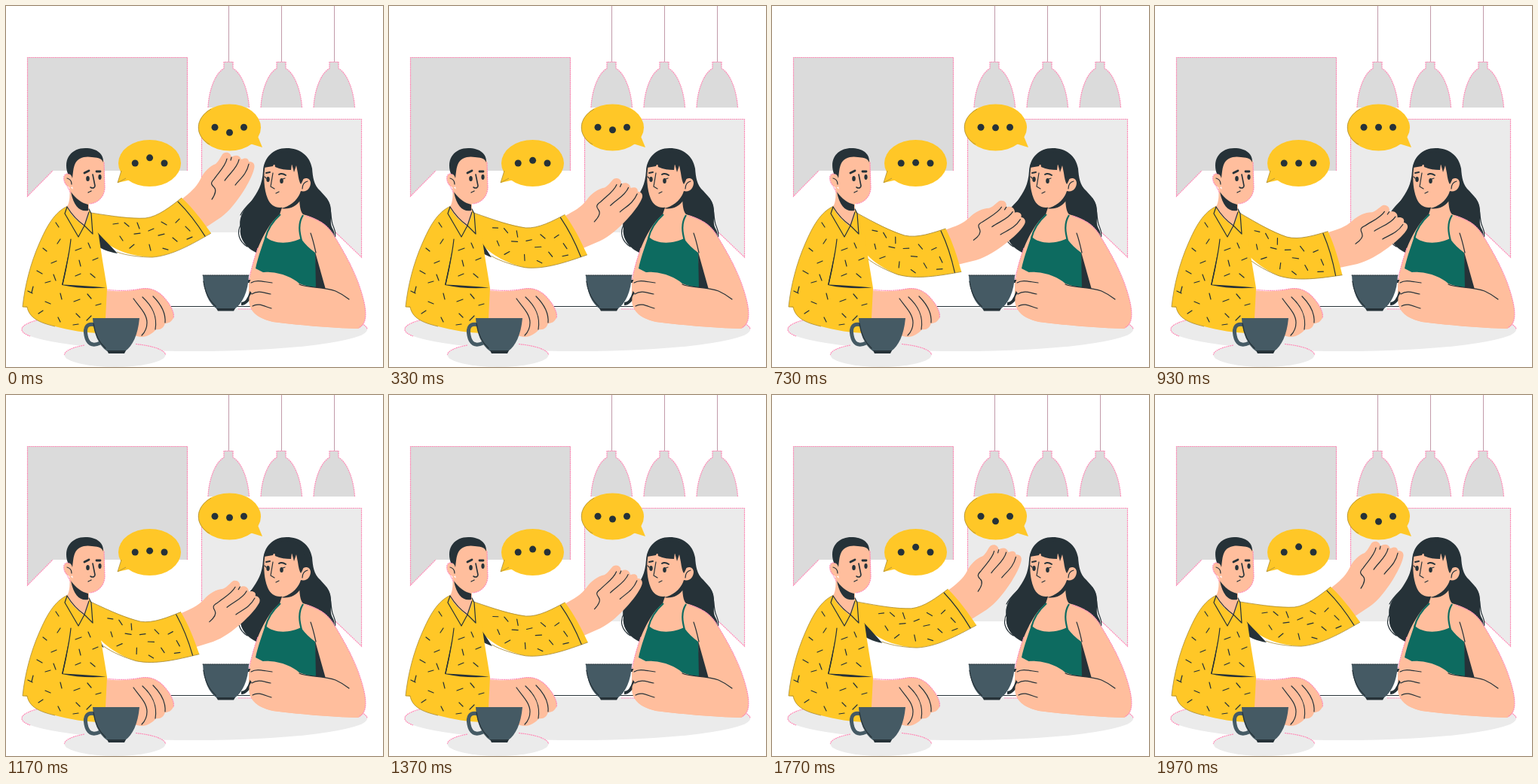
Recreate the animation shown at these times as an HTML page. Size 500 by 480 pixels, loop 2.01 s.

```html
<!DOCTYPE html>
<html lang="en">
<head>
<meta charset="utf-8">
<title>Coffee talk</title>
<style>
  html, body { margin: 0; width: 100%; height: 100%; overflow: hidden; background: #fff; }
  svg { display: block; width: 100vw; height: 100vh; }
  .ink { fill: none; stroke: #263238; stroke-width: 1.2; stroke-linecap: round; stroke-linejoin: round; }
  .brow { stroke-width: 2.8; }
  .rim { fill: none; stroke: #ff8db8; stroke-width: 1.2; stroke-dasharray: 2 .7; }
  .edge { fill: none; stroke: #a88b37; stroke-width: .8; }
  .dark { fill: #263238; }
  .skin { fill: #ffbe9d; }
  .shirt { fill: #ffc727; }
  .cup { fill: #455a64; }
  .wall { fill: #dbdbdb; }
  .pale { fill: #ebebeb; }
</style>
</head>
<body>
<svg viewBox="0 0 500 480" xmlns="http://www.w3.org/2000/svg">
  <defs>
    <g id="lamp">
      <path d="M.5 0V75" stroke="#ff9cc2" fill="none"/>
      <path d="M.5 0V75" stroke="#999" stroke-width=".6" fill="none"/>
      <path class="wall" d="M-6 74H6V83C17 89 26 111 27.500 135H-27C-26 111-17 89-6 83Z"/>
      <path class="rim" d="M-27 135C-26 111-17 89-6 83V74.500H6V83C17 89 26 111 27.500 135"/>
    </g>
  </defs>

  <g id="room">
    <path class="wall" d="M28 68H241V219H62L28 253Z"/>
    <path class="rim" d="M240.500 219V68.500H28.500V253L62 219"/>
    <path class="pale" d="M259 150H472V334L437 301H259Z"/>
    <path class="rim" d="M259.500 301V150.500H471.500V334L437 301"/>
    <use href="#lamp" x="295"/><use href="#lamp" x="365"/><use href="#lamp" x="435"/>
    <ellipse class="pale" cx="250" cy="430" rx="229" ry="29"/>
    <path class="rim" d="M62 413.500C34 418 21 424 21 430Q21 435 32 439M438 413.500C466 418 479 424 479 430"/>
    <ellipse class="pale" cx="144.500" cy="464" rx="67" ry="16"/>
    <path class="rim" d="M104 451C87 454 77.500 459 77.500 464M172 449.500C197 452 211.500 458 211.500 464"/>
    <path d="M210 400.500H335" stroke="#fff" stroke-width="2"/>
    <path class="ink" d="M216 399.500H330"/>
  </g>

  <g id="woman">
    <path class="dark" d="M372 189C354 189 342 202 341 219C340 238 334 247 325 260C313 272 308 284 311 296C309 309 318 322 334 329L378 305L425 312C436 312 438 304 433 296C429 289 432 280 431 272C431 260 424 254 417 246C408 238 407 228 406 216C403 199 390 189 372 189Z"/>
    <path class="ink" d="M342 235C338 254 318 263 311 278M312 290C305 301 309 313 320 320M425 256C432 266 430 280 433 290C436 298 438 302 436 309"/>
    <path class="skin" d="M368 262L389 248C389 264 390 273 394 277C412 282 427 290 436 307C450 330 466 358 474 390C479 410 478 424 467 429C430 428 385 424 354 420C329 414 321 403 322 386C321 365 326 344 334 322C341 305 350 288 363 277Z"/>
    <path fill="#0d6b60" d="M344 306C354 318 379 316 391 309C397 317 403 323 410 328L413 375L370 369L331 349C332 343 334 337 336 330Z"/>
    <path d="M364 277C354 286 347 296 344 309M394 278C387 289 389 301 392 312" fill="none" stroke="#0d6b60" stroke-width="2.200"/>
    <path class="dark" d="M410 327L424 377L411 375Z"/>
    <path class="dark" d="M365 269C376 267 384 260 391 247L390 259C384 267 375 271 365 269Z"/>
    <path class="skin" d="M344 211C341 226 342 244 347 256C351 266 360 270 369 267C380 264 388 256 391 246C399 248 404 242 404 235C403 228 396 227 391 233L388 211Z"/>
    <path class="dark" d="M342 215L354 213L356 209L357 214C364 217 371 218 378 218L379 210L382 221L385 212L387 222C388 229 389 234 391 237C399 225 399 206 386 197C367 188 343 200 342 215Z"/>
    <path class="ink" d="M354 222L351 240L356 243M358 249L362 247M393 243C393 237 396 234 400 233M404 302C407 310 409 319 411 328"/>
    <path class="ink" style="stroke-width:2" d="M345 222L350 221M362 224C365 222 368 223 371 225"/>
    <ellipse class="dark" cx="347.500" cy="230.500" rx="2.200" ry="3.400"/>
    <ellipse class="dark" cx="365.500" cy="232.500" rx="2.300" ry="3.600"/>
    <path class="ink" d="M345 229L343 227M367 230L370 229"/>
    <path class="rim" d="M398 279C418 285 428 293 436 307C450 330 466 358 474 390C479 410 478 424 467 428M334 322C328 339 324 355 322 365M308 403H326"/>
  </g>

  <g id="arm">
    <path class="skin" d="M233 257C244 248 252 242 258 230C262 221 270 213 278 210C283 206 285 199 288 196C293 193 298 195 299 201C304 197 310 198 312 204C317 201 322 202 322 207C327 206 331 210 329 216C327 225 321 236 315 246C306 260 297 272 285 281L264 295Z"/>
    <path class="ink" d="M293 203C291 213 282 221 276 230C270 236 273 238 276 241C280 245 277 251 273 257M309 204C307 215 296 223 290 232M322 210C319 224 310 230 304 238M299 201L298 205"/>
    <path class="shirt" d="M100 273C135 279 159 282 185 282C202 280 219 266 233 255C248 269 260 285 272 302C246 317 220 332 194 334C168 333 143 326 122 306L100 300Z"/>
    <path class="edge" d="M113 275C145 280 165 283 185 282C202 280 219 266 233 255M147 327C160 332 180 334 194 334C220 332 246 317 272 302"/>
    <path class="dark" d="M112 291C126 306 135 315 148 329C136 327 124 323 112 312Z"/>
    <path class="ink" d="M228 260C242 274 254 290 264 306"/>
    <path class="ink" d="M142 290l7-1M157 288l6 5M174 288l3 8M189 299l7-3M206 287l7 4M225 288l5-5M238 293l6 6M151 306l4 6M170 303l8-1M202 305l8-2M221 308l6 5M164 322l6-5M190 317l2 8M208 322l7 2M240 310l7-3"/>
  </g>

  <g id="man">
    <path class="skin" d="M132 378C148 380 163 380 179 376C192 374 202 379 210 388C218 397 224 408 222 415C219 420 216 422 211 422C209 428 205 431 199 430C193 437 184 442 174 439L125 435Z"/>
    <path class="rim" d="M133 377C148 379 163 379 179 376C192 374 202 379 210 388C218 397 224 408 222 415"/>
    <path class="ink" d="M169 389C176 399 187 409 187 421C187 428 184 434 180 438M181 387C194 399 201 412 198 430M195 386C206 397 212 409 211 421"/>
    <path class="shirt" d="M82 266C64 274 54 293 44 316C33 341 25 371 22 400L28 401C31 415 44 421 65 426C83 431 107 435 126 435L132 415L134 375C130 350 126 327 123 305L113 275L107 268Z"/>
    <path class="edge" d="M82 266C64 274 54 293 44 316C33 341 25 371 22 400H28C31 415 44 421 65 426"/>
    <path class="skin" d="M84 240L110 259L110 274C110 280 107 287 103 293C93 284 84 277 81 267C85 260 85 250 84 240Z"/>
    <path class="dark" d="M86 247C93 257 101 262 109 264V272C98 274 90 267 86 247Z"/>
    <path class="skin" d="M88 207C82 218 85 221 85 224C77 219 74 232 81 239C84 242 87 242 88 240C90 252 99 262 111 263C122 262 130 254 131 242L130 206L109 194Z"/>
    <path class="rim" d="M84 224C76 220 74 232 81 239L86 249M130 208L131 242C130 254 122 262 111 263"/>
    <path class="dark" d="M82 223C75 202 88 189 105 189C121 189 130 197 129 208C126 201 120 202 114 201C105 199 95 202 92 209C89 215 89 222 88 229C87 225 85 223 82 223Z"/>
    <path class="ink" d="M81 229C85 230 87 233 87 237M109 248C110 247 112 247 113 246"/>
    <path class="ink" style="stroke-width:1.600" d="M115 224L118 239C118 242 115 243 112 241"/>
    <path class="ink brow" d="M104 222L110 219M120 220L125 220"/>
    <ellipse class="dark" cx="108.500" cy="229.500" rx="2.300" ry="3.500"/>
    <ellipse class="dark" cx="124.500" cy="227.500" rx="2.100" ry="3.400"/>
    <path class="ink" d="M81 267L78 276L96 307L104 292L115 303L113 276L110 270M81 267C87 277 94 285 104 292L110 274M86 310C84 331 79 351 75 370"/>
    <path class="dark" d="M84 324L80 350L75.500 370.500C95 371 115 373 133 374.500C113 376 92 375 74 371Z"/>
    <path class="ink" d="M66 288l4 6M72 310l-4 6M49 322l5 4M92 325l8-3M60 342l7-3M109 315l3 7M41 352l7 4M63 357l3 8M97 338l2 8M115 338l7-3M92 359l7-3M112 356l6 5M36 373l-2 8M29 379l6 3M52 368l7-2M52 393l7 3M72 382l2 8M90 393l8-3M108 383l5 6M119 398l7-2M43 409l6-4M69 414l3 6M93 409l5 5M113 412l-6 6M89 424l7-1"/>
  </g>

  <g id="cups">
    <path d="M118 424C107 421 104 428 106 438C108 449 114 453 125 448" fill="none" stroke="#455a64" stroke-width="5"/>
    <path class="cup" d="M115 415H177C175 437 168 452 158 459H134C123 451 116 436 115 415Z"/>
    <path class="dark" d="M134 458H159L157 462H136Z"/>
    <path class="ink" d="M116 422C118 436 124 448 132 455"/>
    <path d="M317 367C328 363 329 371 325 381C322 391 318 396 312 396" fill="none" stroke="#263238" stroke-width="4"/>
    <path class="cup" d="M261 358H322C321 380 314 395 303 403H280C269 396 262 380 261 358Z"/>
    <path class="dark" d="M279 402H304L302 405.500H281Z"/>
    <path class="ink" d="M261 358H322M262 366C264 382 271 393 279 400" stroke-dasharray="2 1"/>
    <path class="skin" d="M324 365C328 356 338 353 350 354C366 355 380 361 389 369C403 375 424 374 438 379C458 388 470 401 474 417L467 429C430 428 385 424 354 420C334 415 325 407 327 399C321 394 321 386 326 382C321 377 321 370 324 365Z"/>
    <path class="ink" d="M325 368C333 363 342 367 353 368M326 383C335 377 344 382 351 383M327 399C335 394 344 400 352 402M389 370C398 375 423 373 437 379C446 383 450 386 455 390"/>
  </g>

  <g id="bubbles">
    <path class="shirt" d="M153 219L148 235L170 230Z"/>
    <ellipse class="shirt" cx="190.500" cy="209" rx="41.500" ry="31"/>
    <path class="shirt" d="M333 171L340 188L317 181Z"/>
    <ellipse class="shirt" cx="296.500" cy="161.500" rx="41.500" ry="31"/>
    <path class="edge" d="M159 229L148 235L153 219M270 184C250 173 250 149 272 137"/>
    <g class="dark">
      <circle cx="171.200" cy="209" r="4.500"/><circle cx="210" cy="209" r="4.500"/>
      <circle cx="277" cy="161.200" r="4.500"/><circle cx="315.500" cy="161.200" r="4.500"/>
      <circle id="upperDot" cx="190.600" r="4.500"/>
      <circle id="lowerDot" cx="296.500" r="4.500"/>
    </g>
  </g>
</svg>
<script>
  const LOOP = 2010, HALF = LOOP / 2;
  const [arm, upperDot, lowerDot] =
    ['arm', 'upperDot', 'lowerDot'].map(id => document.getElementById(id));
  const easeOut = p => Math.sin(p * Math.PI / 2);

  // Both the lowering and the raising start fast and settle gently.
  function draw(time) {
    const t = time % LOOP;
    const drop = t < HALF ? easeOut(t / HALF) : 1 - easeOut((t - HALF) / HALF);
    arm.setAttribute('transform', `rotate(${21.7 * drop} 114 268)`);
    upperDot.setAttribute('cy', 201.8 + 7.2 * drop);
    lowerDot.setAttribute('cy', 168.3 - 7.1 * drop);
  }

  const start = performance.now();
  function tick() {
    draw(performance.now() - start);
    requestAnimationFrame(tick);
  }
  tick();
</script>
</body>
</html>
```
